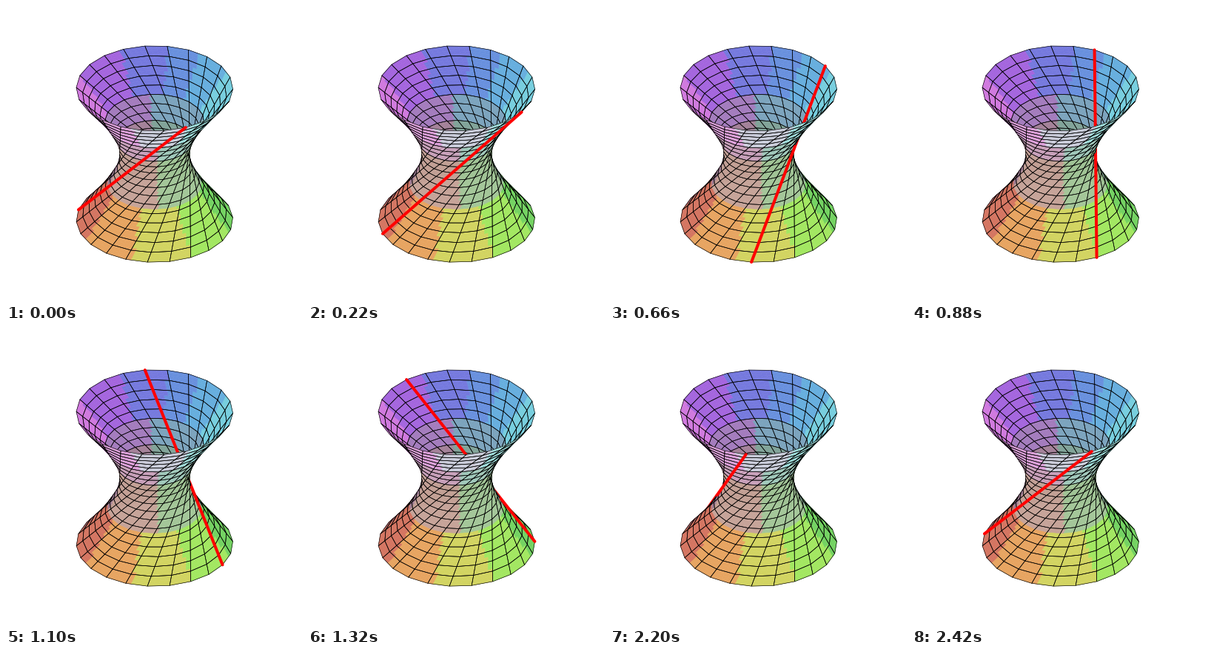
Recreate the animation shown at these times as a matplotlib script. Size 400 by 400 pixels, loop 2.53 s.

```python
import numpy as np
import matplotlib.pyplot as plt
from matplotlib.animation import FuncAnimation
from matplotlib.collections import PolyCollection

SIZE = 400
DPI = 100
PX = 72 / DPI
RULINGS = 22
ROWS = 20
SPLIT = 4  # colour patches per cell side
STEPS = 23
START = np.radians(130)
CX, CY = 200.8, 200
RADIUS = 105.8
ELEV = np.radians(33)
X_AXIS, Y_AXIS = 130, 40  # screen directions of the colour axes, degrees
RIM_HUES = np.array([129, 84, 39, -6, -40, -68, -92, -141, 174])
WAIST_HUES = np.array([130, 40, -50, -140])
BANDS = [-.45, .2, .5]
LEVELS = [-.9, -.15, .35, .8]


def radius(z):
    return np.sqrt((1 + 4 * z**2) / 5)


def ruling(mid, z):
    """Points of one straight line on the hyperboloid: right, near, up."""
    phi = mid - np.arctan(2 * z)
    r = radius(z)
    return np.column_stack([r * np.cos(phi), r * np.sin(phi), z])


def project(p):
    x = CX + RADIUS * p[..., 0]
    y = CY + RADIUS * (p[..., 1] * np.sin(ELEV) - p[..., 2] * np.cos(ELEV))
    return np.stack([x, y], axis=-1)


def depth(p):
    return p[..., 1] * np.cos(ELEV) + p[..., 2] * np.sin(ELEV)


def faces_viewer(p):
    return p[..., 1] * np.cos(ELEV) - 0.8 * p[..., 2] * np.sin(ELEV) > 0


def shade(center):
    """Colour by position along x, y and z in a few flat steps."""
    x, y, z = center
    band = np.digitize(z, BANDS)
    hues = RIM_HUES if band in (0, len(BANDS)) else WAIST_HUES
    phi = np.degrees(np.arctan2(y, x))
    phi = hues[np.argmin(np.abs((hues - phi + 180) % 360 - 180))]
    z = LEVELS[band]
    r = radius(z)
    axes = [r * np.cos(np.radians(phi - X_AXIS)),
            r * np.cos(np.radians(phi - Y_AXIS)), z]
    return tuple((163 + 74 * np.array(axes)) / 255)


def build_cells():
    z = np.linspace(-1, 1, ROWS + 1)
    lines = [ruling(START - 2 * np.pi * k / RULINGS, z) for k in range(RULINGS)]
    cells = []
    for k in range(RULINGS):
        a, b = lines[k], lines[(k + 1) % RULINGS]
        for i in range(ROWS):
            cells.append([a[i], b[i], b[i + 1], a[i + 1]])
    cells = np.array(cells)
    return cells[np.argsort(depth(cells.mean(axis=1)))]


def patches(cell):
    """Split a cell into a small grid so colour steps may cross it."""
    a, b, c, d = cell
    t = np.linspace(0, 1, SPLIT + 1)
    u, v = (m[..., None] for m in np.meshgrid(t, t))
    g = (1 - v) * ((1 - u) * a + u * b) + v * ((1 - u) * d + u * c)
    quads = np.stack([g[:-1, :-1], g[:-1, 1:], g[1:, 1:], g[1:, :-1]], axis=2)
    return quads.reshape(-1, 4, 3)


def add_wall(cells, zorder):
    quads = np.concatenate([patches(c) for c in cells])
    ax.add_collection(PolyCollection(
        project(quads), facecolors=[shade(q.mean(axis=0)) for q in quads],
        edgecolors="face", linewidths=0.5 * PX, zorder=zorder))
    ax.add_collection(PolyCollection(
        project(cells), facecolors="none", edgecolors="black",
        linewidths=0.65 * PX, zorder=zorder + 0.5))


def red_line(zorder):
    return ax.plot([], [], color="#ff0000", lw=4 * PX,
                   solid_capstyle="round", zorder=zorder)[0]


def set_ends(artist, points):
    ends = points[[0, -1]] if len(points) else points
    artist.set_data(ends[:, 0], ends[:, 1])


fig = plt.figure(figsize=(SIZE / DPI, SIZE / DPI), dpi=DPI, facecolor="white")
ax = fig.add_axes([0, 0, 1, 1])
ax.set_xlim(0, SIZE)
ax.set_ylim(SIZE, 0)
ax.axis("off")

cells = build_cells()
flat = project(cells)
d1, d2 = flat[:, 2] - flat[:, 0], flat[:, 3] - flat[:, 1]
outside = d1[:, 0] * d2[:, 1] - d1[:, 1] * d2[:, 0] < 0
if depth(cells[outside].mean(axis=1)).mean() < 0:
    outside = ~outside

# inner wall, line behind, outer wall, line in front
add_wall(cells[~outside], 1)
behind = red_line(2)
add_wall(cells[outside], 3)
front = red_line(4)


def draw(i):
    line = ruling(START - 2 * np.pi * i / (STEPS - 1), np.linspace(-1, 1, 201))
    near = faces_viewer(line)
    points = project(line)
    set_ends(behind, points[~near])
    set_ends(front, points[near])
    return behind, front


anim = FuncAnimation(fig, draw, frames=STEPS, interval=110, repeat=True)
plt.show()
```
